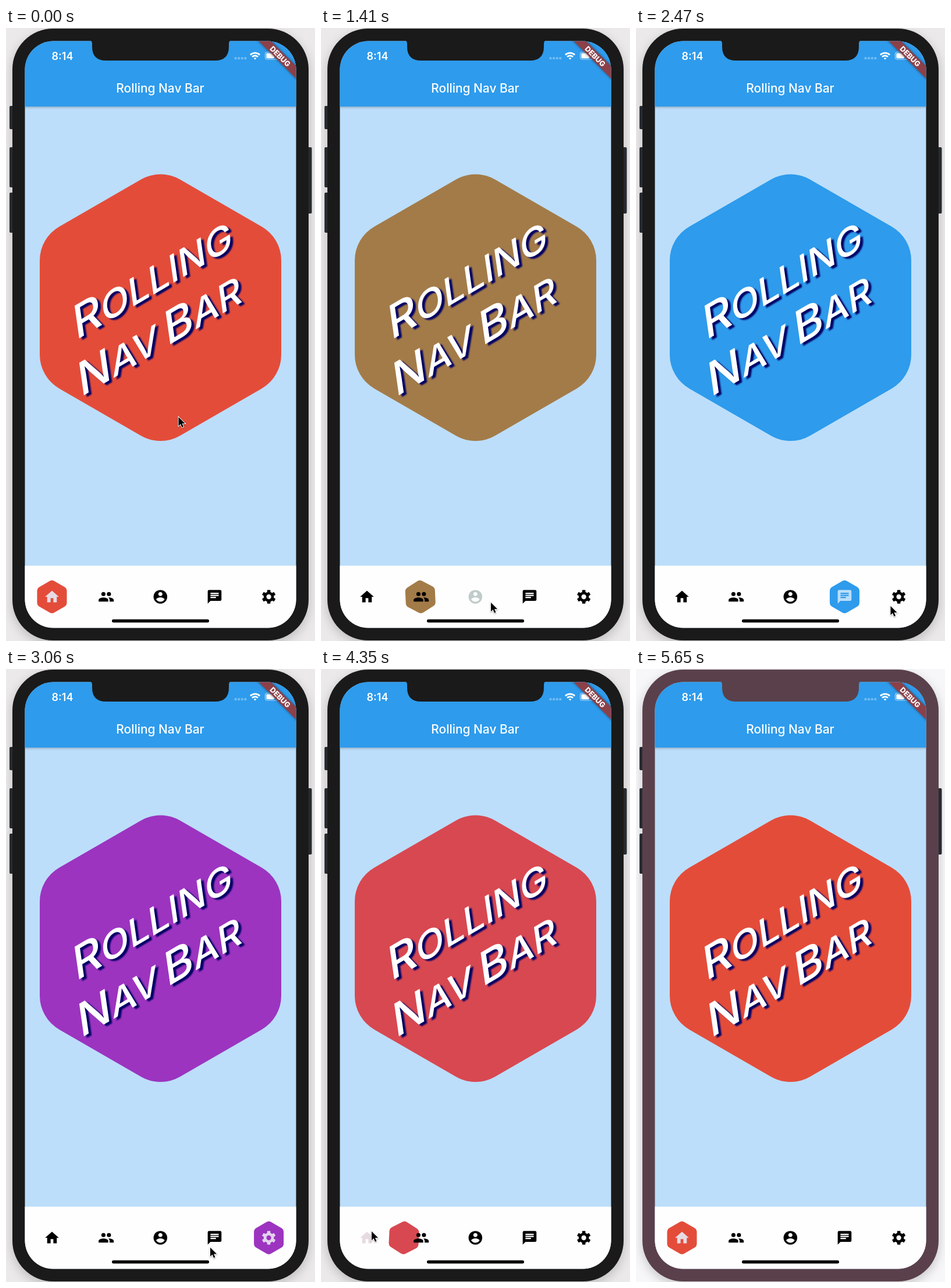
These frames come from a looping animation (531 px wide and 1054 px high, 6710 ms). An HTML page:

```html
<!DOCTYPE html>
<html lang="en">
<head>
<meta charset="utf-8">
<title>Rolling Nav Bar</title>
<style>
  html, body { margin: 0; width: 100%; height: 100%; overflow: hidden; }
  svg { display: block; width: 100%; height: 100%; }
  text { font-family: Inter, Roboto, sans-serif; fill: #fff; }
  #phone { filter: drop-shadow(0 6px 9px rgba(0, 0, 0, .2)); }
  #appBar { filter: drop-shadow(0 1px 2px rgba(0, 0, 0, .3)); }
  #logo { filter: drop-shadow(5px 3.5px 1.2px #000064); font-size: 73px; font-weight: 500; word-spacing: -5px; }
  #logo .small { font-size: 61px; }
  #cursor { filter: drop-shadow(0 1px 1px rgba(0, 0, 0, .35)); }
</style>
</head>
<body>
<svg viewBox="0 0 531 1054">
  <defs>
    <clipPath id="screen"><rect x="32.5" y="22.5" width="466" height="1009" rx="49"/></clipPath>
    <polygon id="hexagon" stroke-width="134.4" stroke-linejoin="round"/>
    <g id="icon0"><path d="M10 20v-6h4v6h5v-8h3L12 3 2 12h3v8z"/></g>
    <g id="icon1">
      <circle cx="8" cy="8" r="3"/><circle cx="16" cy="8" r="3"/>
      <path d="M8 13c-2.33 0-7 1.17-7 3.5V19h14v-2.5C15 14.17 10.33 13 8 13z"/>
      <path d="M16 13l-.97.05C16.2 13.9 17 15 17 16.5V19h6v-2.5C23 14.17 18.33 13 16 13z"/>
    </g>
    <g id="icon2">
      <path fill-rule="evenodd" d="M12 2a10 10 0 1 0 .01 0zM12 5a3 3 0 1 1-.01 0zM12 19.2c-2.5 0-4.7-1.28-6-3.22.03-2 4-3.08 6-3.08s5.97 1.1 6 3.08c-1.3 1.94-3.5 3.22-6 3.22z"/>
    </g>
    <g id="icon3">
      <path fill-rule="evenodd" d="M20 2H4a2 2 0 0 0-2 2V22l4-4h14a2 2 0 0 0 2-2V4a2 2 0 0 0-2-2zM6 9h12v2H6zM6 12h8v2H6zM6 6h12v2H6z"/>
    </g>
    <g id="icon4">
      <circle cx="12" cy="12" r="5.5" fill="none" stroke="currentColor" stroke-width="4"/>
    </g>
  </defs>

  <rect id="page" width="531" height="1054"/>
  <g fill="#2b3036">
    <rect x="6" y="134" width="10" height="40" rx="2"/>
    <rect x="6" y="205" width="10" height="69" rx="2"/>
    <rect x="6" y="283" width="10" height="69" rx="2"/>
    <rect x="514" y="205" width="11.5" height="114" rx="2"/>
  </g>
  <rect id="phone" x="11" y="1" width="509" height="1052" rx="70"/>

  <g clip-path="url(#screen)">
    <rect x="32" y="22" width="467" height="1010" fill="#bcdefa"/>
    <rect id="appBar" x="32" y="22" width="467" height="113" fill="#2e9bec"/>
    <rect x="32" y="924.5" width="467" height="107" fill="#fefefe"/>
    <text x="97" y="54.5" font-size="18" font-weight="600" text-anchor="middle">8:14</text>
    <text x="265" y="111.2" font-size="20.9" font-weight="500" text-anchor="middle">Rolling Nav Bar</text>
    <path d="M394.5 52H412" stroke="#fff" stroke-opacity=".32" stroke-width="4.4" stroke-linecap="round" stroke-dasharray="0 5.6"/>
    <g fill="none" stroke="#fff" stroke-width="2.7">
      <path d="M419.9 46.2a11.6 11.6 0 0 1 16.2 0"/>
      <path d="M423 49.6a7.2 7.2 0 0 1 10 0"/>
      <path d="M428 54.5l-2.3-2.5a3.4 3.4 0 0 1 4.6 0z" fill="#fff" stroke="none"/>
    </g>
    <rect x="445.5" y="41.5" width="24" height="12.5" rx="3.5" fill="none" stroke="#fff" stroke-opacity=".6" stroke-width="1.2"/>
    <rect x="447.3" y="43.3" width="14" height="9" rx="2" fill="#fff"/>
    <g transform="translate(498 22) rotate(45)">
      <rect x="-70" y="30.4" width="140" height="15" fill="#8c4048" style="filter:drop-shadow(0 0 2px rgba(0,0,0,.5))"/>
      <text y="42.5" font-size="12.6" font-weight="800" text-anchor="middle">DEBUG</text>
    </g>

    <use href="#hexagon" class="tinted" transform="translate(265.5 480.7)"/>
    <g id="logo">
      <text transform="matrix(1 -.59 .15 1.055 120 537)">R<tspan class="small">OLLING</tspan></text>
      <text transform="matrix(1 -.59 .15 1.055 128 635)">N<tspan class="small">AV </tspan>B<tspan class="small">AR</tspan></text>
    </g>

    <use href="#hexagon" class="tinted" id="ball"/>
    <g id="icons"></g>
    <rect x="182" y="1016.8" width="167" height="5.4" rx="2.7"/>
  </g>
  <path id="notch" d="M144 21q4 1 4 6v5q0 24 24 24h187q24 0 24-24v-5q0-5 4-6z"/>

  <path id="cursor" d="M0 0V17L4 13.3 6.7 19.8 9.4 18.7 6.7 12.2H12.3Z" stroke="#fff" stroke-width="2" paint-order="stroke"/>
</svg>

<script>
const LOOP = 6710, TICKS_PER_MS = 17 / 1000;
const tints = [[228, 76, 58], [236, 155, 60], [96, 171, 86], [46, 155, 236], [156, 52, 192]];
const activeIcon = ['#e7dbe3', '#eee0cf', '#c0cbca', '#bcdefa', '#e2d3ec'];

// start tick, from tab, to tab, length in ticks
const rolls = [[20.65, 0, 2, 6.8], [34.4, 2, 3, 3.4], [48.4, 3, 4, 3.4], [65, 4, 0, 10.85]];

// tick, x, y of the pointer tip
const pointerPath = [
  [3, 296.5, 669], [6, 293, 710], [11, 276, 930], [15, 271, 980], [17, 270, 981], [20, 270, 981],
  [24, 292, 988], [28, 333, 993], [32, 357.5, 983], [35, 357.5, 983], [42, 437.5, 994], [46, 459, 985],
  [48, 459, 985], [55, 270, 1002], [60, 91, 969], [61, 87, 967], [81, 87, 967], [87, -18, 973]
];

const byId = id => document.getElementById(id);
const lerp = (a, b, p) => a + (b - a) * p;
const tabX = tab => 79 + tab * 93.15;

const corners = [...Array(6).keys()].map(i => {
  const angle = (i * 60 + 30) * Math.PI / 180;
  return [162 * Math.cos(angle), 162 * Math.sin(angle)].map(v => v.toFixed(2));
});
byId('hexagon').setAttribute('points', corners.join(' '));

for (let i = 0; i < 6; i++) {
  byId('icon4').innerHTML +=
    `<rect x="9.6" y="2" width="4.8" height="5" rx=".7" transform="rotate(${i * 60} 12 12)"/>`;
}
byId('icons').innerHTML = tints.map((_, tab) =>
  `<use href="#icon${tab}" transform="translate(${tabX(tab)} 978) scale(1.18) translate(-12 -12)"/>`).join('');
const icons = [...byId('icons').children];

function pointerAt(tick) {
  const next = pointerPath.findIndex(key => key[0] > tick);
  if (next === 0) return pointerPath[0].slice(1);
  if (next < 0) return pointerPath.at(-1).slice(1);
  const a = pointerPath[next - 1], b = pointerPath[next];
  const p = (tick - a[0]) / (b[0] - a[0]);
  return [lerp(a[1], b[1], p), lerp(a[2], b[2], p)];
}

function draw(time) {
  const tick = Math.floor((time + 5) * TICKS_PER_MS);

  const [start, from, to, length] = rolls.findLast(roll => roll[0] <= tick) || [0, 0, 0, 1];
  let progress = (tick - start) / length;
  if (progress > .9) progress = 1;
  const position = lerp(from, to, progress);
  const tint = `rgb(${tints[from].map((v, i) => Math.round(lerp(v, tints[to][i], progress)))})`;
  for (const shape of document.querySelectorAll('.tinted')) {
    shape.setAttribute('fill', tint);
    shape.setAttribute('stroke', tint);
  }
  byId('ball').setAttribute('transform',
    `translate(${tabX(position)} 978) rotate(${position * 180}) scale(.123)`);
  icons.forEach((icon, tab) => {
    const color = tab === to ? activeIcon[tab] : '#000';
    icon.setAttribute('fill', color);
    icon.setAttribute('color', color);
  });

  byId('cursor').setAttribute('transform', `translate(${pointerAt(tick)}) scale(.9)`);

  const late = tick >= 96;
  const bezel = late ? '#5a404b' : '#1a1a1a';
  byId('page').setAttribute('fill', late ? '#f7f7f9' : '#ebe9ea');
  byId('phone').setAttribute('fill', bezel);
  byId('notch').setAttribute('fill', bezel);
}

const begin = performance.now();
function loop() {
  draw((performance.now() - begin) % LOOP);
  requestAnimationFrame(loop);
}
loop();
</script>
</body>
</html>
```
